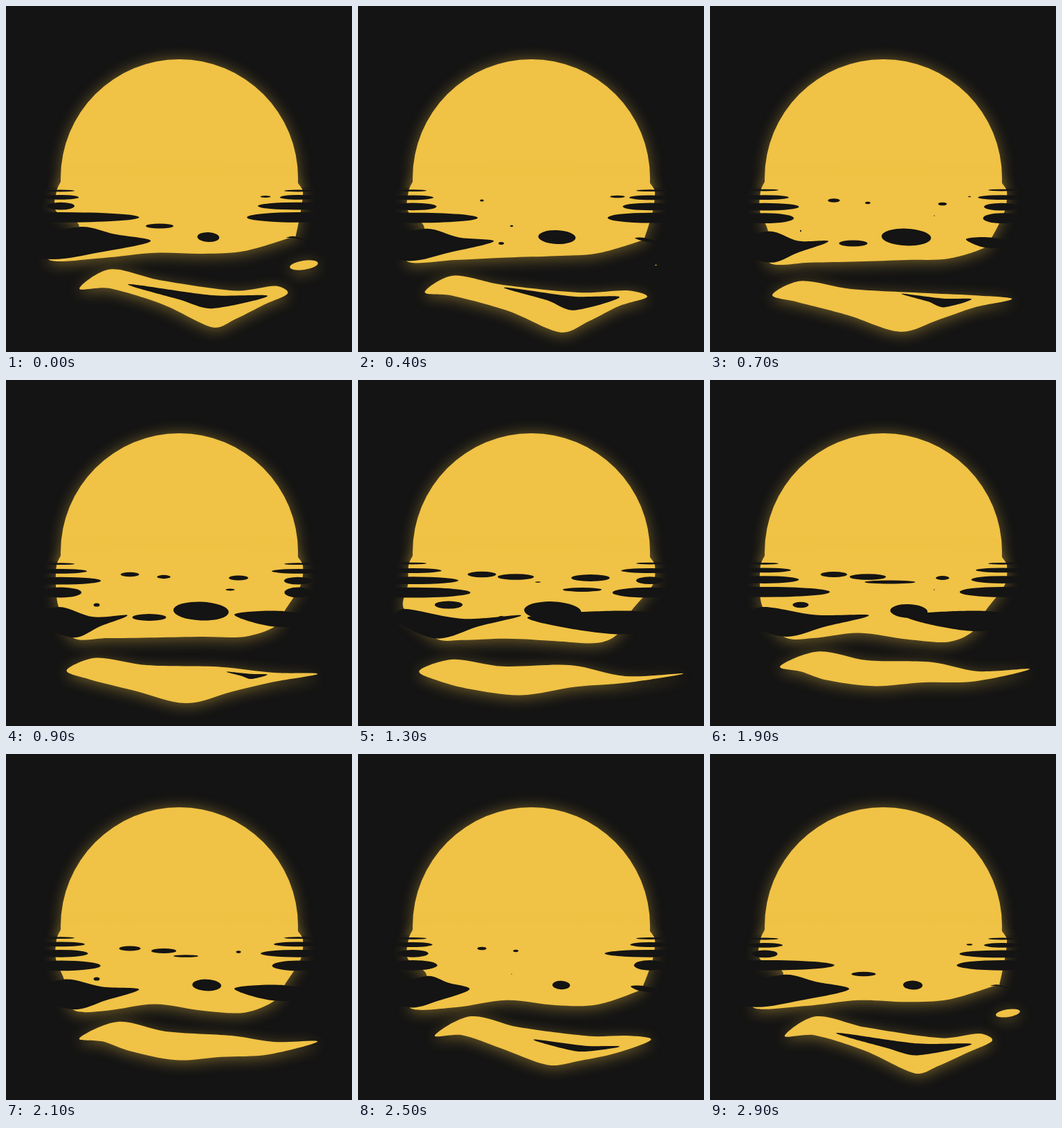
These frames come from a looping animation (500x500 px, 3 s). An HTML page with a canvas:

```html
<!DOCTYPE html>
<html lang="en">
<head>
<meta charset="utf-8">
<title>Sun over water</title>
<style>
  html, body { margin: 0; width: 100%; height: 100%; overflow: hidden; background: #141414; }
  canvas { display: block; width: 500px; height: 500px; }
</style>
</head>
<body>
<canvas id="stage" width="500" height="500"></canvas>
<script>
const LOOP = 3000, STEP = 100, HORIZON = 262;
const DARK = '#141414', GOLD = '#f0c245', GLOW = 'rgba(240, 194, 69, .4)';
const ctx = document.getElementById('stage').getContext('2d');
let time = 0;

// Periodic motion: a swing in -1..1 and a one-sided pulse in 0..1.
const swing = (peak, turns = 1) => Math.cos(2 * Math.PI * turns * (time - peak) / LOOP);
const pulse = (peak, sharp = 1) => ((1 + swing(peak)) / 2) ** sharp;

// A point of water circling its rest place.
const orbit = (x, ax, px, y, ay, py) => [x + ax * swing(px), y + ay * swing(py)];
const between = (a, b, y) => [(a[0] + b[0]) / 2, y];

// Closed smooth curve; handles never exceed a third of their chord.
function blob(points, color) {
  const at = i => points[(i + points.length) % points.length];
  const handle = (i, chord) => {
    const [ax, ay] = at(i - 1), [bx, by] = at(i + 1);
    const dx = bx - ax, dy = by - ay;
    const k = Math.min(1, 2 * chord / (Math.hypot(dx, dy) || 1)) / 6;
    return [dx * k, dy * k];
  };
  ctx.fillStyle = color;
  ctx.beginPath();
  ctx.moveTo(...points[0]);
  points.forEach(([x, y], i) => {
    const [u, v] = at(i + 1), chord = Math.hypot(u - x, v - y);
    const a = handle(i, chord), b = handle(i + 1, chord);
    ctx.bezierCurveTo(x + a[0], y + a[1], u - b[0], v - b[1], u, v);
  });
  ctx.fill();
}

function oval(x, y, rx, ry, color, tilt = 0) {
  ctx.fillStyle = color;
  ctx.beginPath();
  ctx.ellipse(x, y, Math.max(0, rx), Math.max(0, ry), tilt, 0, 2 * Math.PI);
  ctx.fill();
}

function glowing(drop, draw) {
  ctx.save();
  ctx.shadowColor = GLOW;
  ctx.shadowBlur = 20;
  ctx.shadowOffsetY = drop;
  draw();
  ctx.restore();
}

function sun() {
  ctx.save();
  ctx.beginPath();
  ctx.rect(0, 0, 500, HORIZON);
  ctx.clip();
  glowing(0, () => oval(250.5, 248.5, 171.5, 171.5, GOLD));
  ctx.restore();
}

// Dark ripples reach in from a side, wider and thicker towards the viewer.
function ripples(edge, reach, lag) {
  const depth = [
    20,
    34 + 8 * swing(1400),
    42 + 24 * swing(lag),
    reach * (75 + 45 * swing(130, 2))
  ];
  depth.forEach((d, i) => {
    const y = HORIZON + 4 + 8 * i + 1.8 * i * i;
    oval(edge, y + swing(400 * i), d, 1.4 + 2 * i, DARK);
  });
}

function reflection() {
  const leftLobe = orbit(86, 20, 2900, 325, 6, 1400);
  const rightLobe = orbit(406, 12, 0, 334.5, 1, 0);
  const leftTail = orbit(88, 27, 1500, 369.5, 4, 1300);
  const rightTail = orbit(395, 22, 0, 351, 18, 1500);

  glowing(4, () => blob([
    [86, 246], [78, 256], [73, 268], [72, 296], leftLobe, leftTail,
    orbit(145, 6, 1500, 370, 6, 1400),
    orbit(215, 0, 0, 364.5, 9.5, 1200),
    orbit(285, 0, 0, 368, 10, 1500),
    orbit(345, 0, 0, 368, 14, 1550),
    rightTail, rightLobe, [426, 296], [429, 268], [422, 256], [414, 246]
  ], GOLD));

  // Two wedges open between body and tail; at their widest they meet.
  const leftTip = [202 + 35 * swing(100, 2) + 25 * swing(1500), 340];
  const open = pulse(1500, 2);
  blob([
    leftLobe, between(leftLobe, leftTip, 337 + 8 * swing(1300)), leftTip,
    between(leftTail, leftTip, 356), leftTail, [leftTail[0] - 60, 346]
  ], DARK);
  blob([rightTail, [405 - 175 * open, 335 + 9 * open], rightLobe, [470, 350]], DARK);

  ripples(79, 1, 1300);
  ripples(422, .65, 2600);
}

// Each opening: place, full size, moment it is widest, how briefly it lasts.
const openings = [
  [179, 281, 22, 4.3, 1550, 1],
  [228, 284.5, 32, 4.8, 1600, 2],
  [336, 286, 28, 5, 1350, 3],
  [131, 325, 24, 6, 1500, 4],
  [207, 343, 25, 5, 850, 8],
  [222, 318, 20, 3.4, 0, 12],
  [324, 303, 28, 3, 1300, 8],
  [260, 292, 40, 2.6, 1800, 8],
  [375, 275.5, 13, 2, 250, 8]
];

function holes() {
  for (const [x, y, rx, ry, peak, sharp] of openings) {
    const s = pulse(peak, sharp);
    if (s > .03) oval(x, y, rx * s, ry * Math.sqrt(s), DARK);
  }
  const s = pulse(1150);
  oval(294 - 13 * s, 334, 12 + 30 * s, 6 + 8 * s, DARK, .04);
}

function nearWave() {
  glowing(4, () => {
    blob([
      orbit(99, 12, 2550, 413.5, 7, 1150),
      orbit(147, 17, 2350, 391, 13, 1200),
      orbit(218, 15, 2350, 404, 10, 1200),
      orbit(322, 14, 2700, 411, 4, 700),
      orbit(388, 2, 0, 416, 12, 1350),
      orbit(440, 33, 1500, 419, 6, 1050),
      orbit(380, 8, 1300, 434.5, 3, 1300),
      orbit(322, 13, 300, 446, 9, 400),
      orbit(264, 36, 100, 457, 15, 500),
      orbit(192, 34, 50, 437, 12, 1000),
      orbit(134, 18, 2700, 420, 15, 1200)
    ], GOLD);
    const drop = pulse(0, 14);
    if (drop > .05) oval(430.5, 374.5, 20.5 * drop, 6.5 * drop, GOLD, -.15);
  });

  // The leaf-shaped opening shrinks towards its right end.
  const stretch = pulse(50, 1.5), thick = pulse(300, 3);
  if (thick < .02) return;
  const width = 190 * stretch + 12, left = 378 - width;
  blob([
    [left, 428 - 26 * stretch],
    [left + width * .6, 427 - 9 * stretch],
    [378, 428 - 9 * stretch],
    [left + width * .6, 429 + 11 * thick],
    [left + width * .38, 429 - 4 * stretch]
  ], DARK);
}

function paint() {
  ctx.fillStyle = DARK;
  ctx.fillRect(0, 0, 500, 500);
  sun();
  reflection();
  holes();
  nearWave();
}

let shown = -1;
function tick(now) {
  const step = Math.floor(now % LOOP / STEP);
  if (step !== shown) {
    shown = step;
    time = step * STEP;
    paint();
  }
  requestAnimationFrame(tick);
}

paint();
requestAnimationFrame(tick);
</script>
</body>
</html>
```
